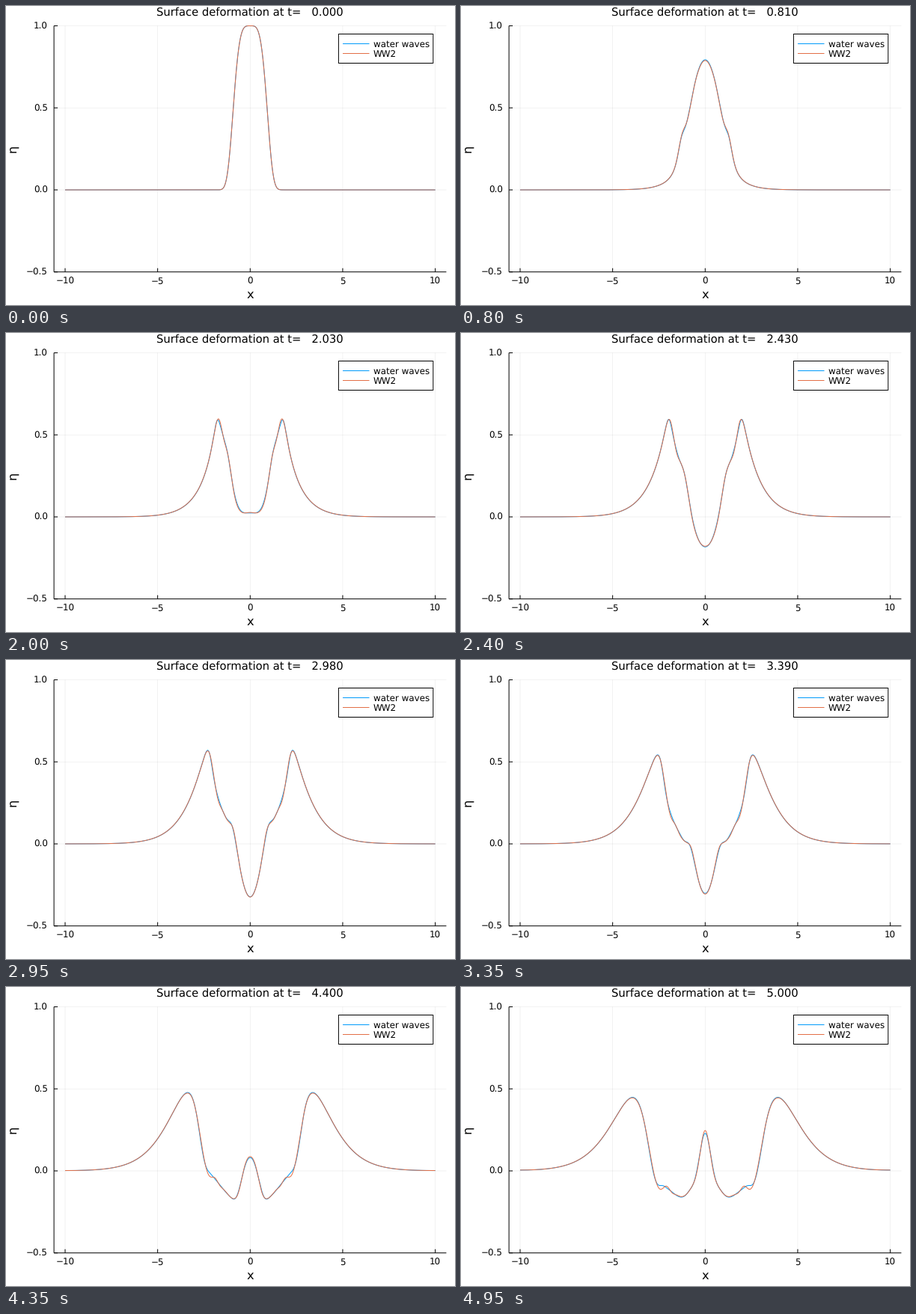
These frames come from a looping animation (600 by 400 pixels, 5 s). A matplotlib script:

```python
import numpy as np
import matplotlib.pyplot as plt
from matplotlib.animation import FuncAnimation
from matplotlib.patches import Rectangle

W, H, DPI = 600, 400, 100
FRAMES, STEPS, T_END = 100, 500, 5.0
EPS, DELTA, HALF, M = 0.25, 0.1, 10.0, 160
BLUE, ORANGE = "#009AFA", "#E36F47"
X0, Y0, SX, SY = 326.3, 246.0, 24.73, 219.5

# Even periodic fields on the half tank, expanded in cosines
n = np.arange(M + 1)
x = HALF * n / M
k = np.pi * n / HALF
C = np.cos(np.outer(x, k))
C_INV = np.linalg.inv(C)


def multiplier(symbol):
    return (C * symbol) @ C_INV


DX = (-k * np.sin(np.outer(x, k))) @ C_INV
DXX = multiplier(-k**2)
G0 = multiplier(k * np.tanh(k))
DEALIAS = multiplier((n <= 2 * M // 3).astype(float))
RECTIFY = multiplier(np.minimum(1, 1 / np.maximum(DELTA * k, 1e-9)))
MODES = C / np.cosh(k)


def full_waves(u):
    """Full water waves: harmonic potential fitted at the free surface."""
    eta, psi = u
    up = np.exp(np.outer(1 + EPS * eta, k))
    down = 1 / up
    coef = np.linalg.solve(MODES * (up + down) / 2, psi)
    w = (MODES * (up - down) / 2) @ (k * coef)
    slope, v = EPS * (DX @ eta), DX @ psi
    stretch = 1 + slope**2
    return np.array([DEALIAS @ (w * stretch - slope * v),
                     DEALIAS @ (-eta - EPS / 2 * (v**2 - w**2 * stretch))])


def quadratic_waves(u):
    """Second-order expansion with rectified nonlinear terms."""
    eta, psi = u
    smooth, v, g = RECTIFY @ eta, DX @ psi, G0 @ psi
    flux = (DX @ smooth) * v + smooth * (DXX @ psi) + G0 @ (smooth * g)
    return np.array([DEALIAS @ (g - EPS * flux),
                     DEALIAS @ (-eta - EPS / 2 * (RECTIFY @ (v**2 - g**2)))])


def evolve(rate):
    dt = T_END / STEPS
    u = np.array([DEALIAS @ np.exp(-x**4), np.zeros(M + 1)])
    history = [u[0]]
    for _ in range(STEPS):
        a = rate(u)
        b = rate(u + dt / 2 * a)
        c = rate(u + dt / 2 * b)
        d = rate(u + dt * c)
        u = u + dt / 6 * (a + 2 * b + 2 * c + d)
        history.append(u[0])
    return np.array(history)


xs = np.linspace(-HALF, HALF, 1201)
FINE = np.cos(np.outer(xs, k)) @ C_INV
histories = [evolve(full_waves), evolve(quadratic_waves)]


def px(size):
    return size * 72 / DPI


plt.rcParams["font.family"] = "DejaVu Sans"
plt.rcParams["text.hinting"] = "none"
plt.rcParams["path.snap"] = False
fig = plt.figure(figsize=(W / DPI, H / DPI), dpi=DPI, facecolor="white")
ax = fig.add_axes([0, 0, 1, 1])
ax.set_xlim(0, W)
ax.set_ylim(H, 0)
ax.axis("off")


def line(xa, ya, color="black", width=1.0, **kw):
    return ax.plot(xa, ya, color=color, lw=px(width),
                   solid_capstyle="butt", **kw)[0]


def label(xp, yp, s, size, ha="center", **kw):
    return ax.text(xp, yp, s, fontsize=px(size), ha=ha, va="baseline", **kw)


SMALL, MEDIUM, LARGE = 11.85, 14.81, 16.3
LEFT, RIGHT, TOP, BOTTOM = 64.1, 588.4, 26.5, 355.75
XTICKS = [(X0 + SX * v, str(v).replace("-", "\u2212")) for v in (-10, -5, 0, 5, 10)]
YTICKS = [(Y0 - SY * v, f"{v:.1f}".replace("-", "\u2212")) for v in (-0.5, 0, 0.5, 1)]

for xp, _ in XTICKS:
    line([xp, xp], [TOP, BOTTOM], width=0.5, alpha=0.1)
for yp, _ in YTICKS:
    line([LEFT, RIGHT], [yp, yp], width=0.5, alpha=0.1)
line([LEFT, RIGHT], [BOTTOM, BOTTOM])
line([LEFT, LEFT], [TOP, BOTTOM])
for xp, s in XTICKS:
    line([xp, xp], [BOTTOM, BOTTOM - 5])
    label(xp, 371.6, s, SMALL)
for yp, s in YTICKS:
    line([LEFT, LEFT + 5], [yp, yp])
    label(55.7, yp + 4.3, s, SMALL, ha="right")

label(X0, 391, "x", LARGE)
label(14, 190.7, "\u03b7", LARGE, rotation=90, rotation_mode="anchor")
title = label(X0, 13, "", MEDIUM)

window = Rectangle((LEFT, TOP - 0.3), RIGHT - LEFT, BOTTOM - TOP, transform=ax.transData)
curves = []
for color in (BLUE, ORANGE):
    curve = line([], [], color, solid_joinstyle="round")
    curve.set_clip_path(window)
    curves.append(curve)

ax.add_patch(Rectangle((444.4, 37.5), 126.4, 39, fc="white", ec="black",
                       lw=px(1), zorder=3))
for yp, color, s in ((50.5, BLUE, "water waves"), (63.5, ORANGE, "WW2")):
    line([450, 485.5], [yp, yp], color, zorder=4)
    label(490.6, yp + 4.4, s, SMALL, ha="left", zorder=4)


def update(i):
    step = -(-STEPS * i // (FRAMES - 1))
    title.set_text(f"Surface deformation at t=   {step * T_END / STEPS:.3f}")
    for curve, history in zip(curves, histories):
        curve.set_data(X0 + SX * xs, Y0 - SY * (FINE @ history[step]))
    return [title, *curves]


anim = FuncAnimation(fig, update, frames=FRAMES, interval=50, repeat=True,
                     repeat_delay=0, blit=False)
plt.show()
```
